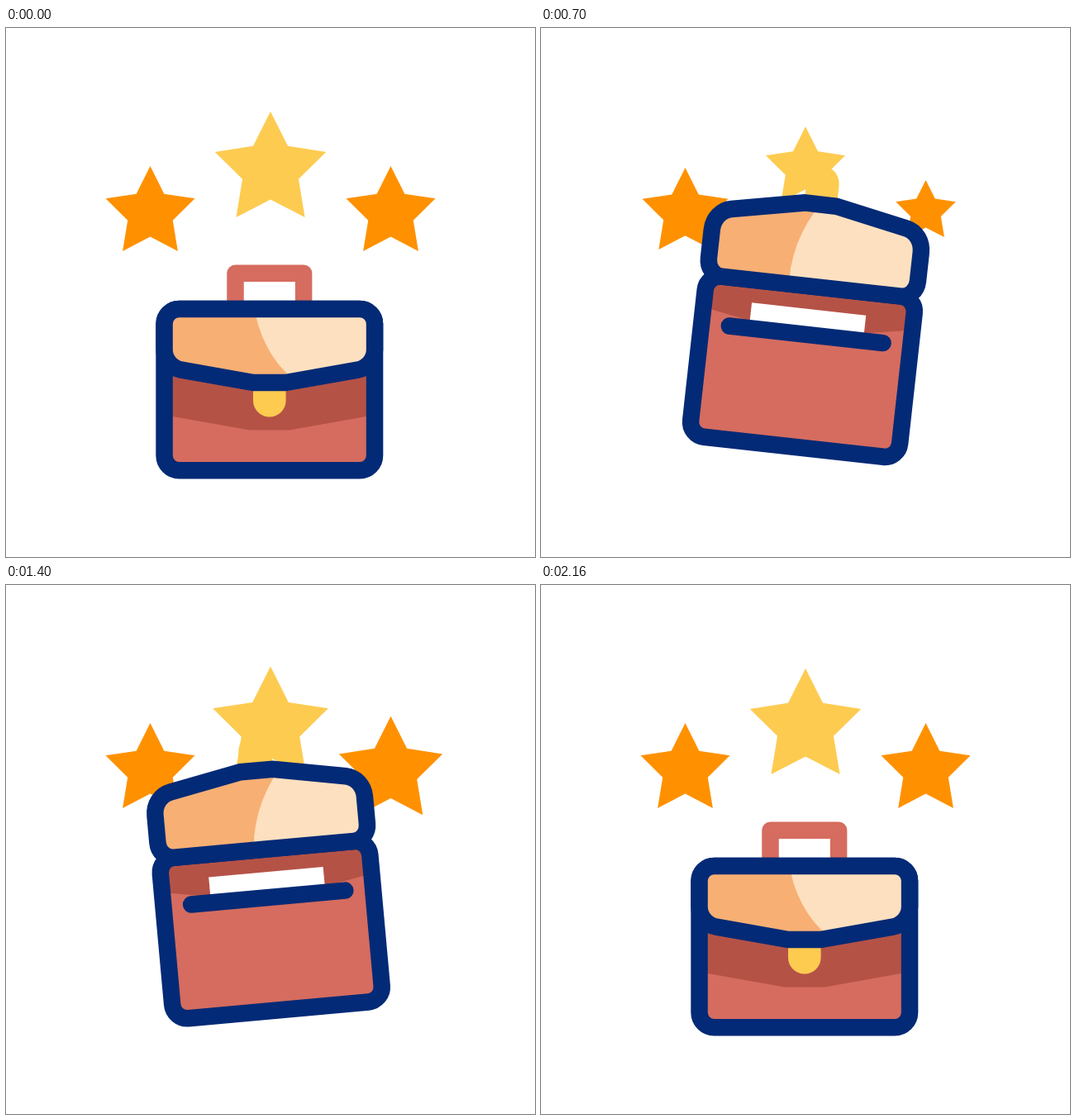
Animation, 640 px wide and 640 px high, one loop 2400 ms. Source, as an HTML page with a canvas:

```html
<!DOCTYPE html>
<html lang="en">
<head>
<meta charset="utf-8">
<title>Briefcase</title>
<style>
html, body { margin: 0; width: 100%; height: 100%; overflow: hidden; background: #fff; }
canvas { display: block; width: 100vmin; height: 100vmin; }
</style>
</head>
<body>
<canvas id="stage"></canvas>
<script>
const SIZE = 640, LOOP = 2400, ACTIVE = 2160, LINE = 20.5;
const NAVY = '#032a76', RED = '#d56c5f', DARK = '#b55246', TAN = '#f7af74',
      CREAM = '#fde0bf', YELLOW = '#fdcb50', ORANGE = '#ff9100';

// Case geometry: x from its middle, y from the hinge
const CENTER = 318.8, HINGE = 340, PIVOT = 76;
const HALF = 127.25, HEIGHT = 195.3, DEPTH = 89, RADIUS = 18, OPEN = -1.12;

const STARS = [
  { x: 174.5, y: 218.5, r: 56.8, color: ORANGE, delay: 0, low: 0.66, high: 1.29 },
  { x: 320, y: 165, r: 70.7, color: YELLOW, delay: 165, low: 0.68, high: 1.22 },
  { x: 465.5, y: 218.5, r: 56.8, color: ORANGE, delay: 360, low: 0.6, high: 1.18 }
];

const canvas = document.getElementById('stage');
const ctx = canvas.getContext('2d');
const ratio = Math.max(1, window.devicePixelRatio || 1);
canvas.width = canvas.height = SIZE * ratio;

// Eases 0 to 1 between two times
function ease(t, from, to) {
  const p = Math.min(1, Math.max(0, (t - from) / (to - from)));
  return (1 - Math.cos(Math.PI * p)) / 2;
}

// Eases through values reached at the given times
function through(t, times, values) {
  let v = values[0];
  for (let i = 1; i < values.length; i++) {
    v += (values[i] - values[i - 1]) * ease(t, times[i - 1], times[i]);
  }
  return v;
}

const hop = t => through(t, [0, 300, 745, 1050, 1400, 1780, ACTIVE], [0, 61, -30, 55, -20.5, 15.5, 0]);

function sway(t) {
  const peaks = [0, -15, 16, -6.5, 3, 0];
  return through(t, peaks.map((_, i) => i * ACTIVE / 5), peaks);
}

const lidScale = t => 1 + (OPEN - 1) * (ease(t, 160, 590) - ease(t, 1340, 2002));

function starScale(star, t) {
  const low = 455 + star.delay, high = low + 505;
  return through(t, [153 + 0.7 * star.delay, low, high, high + 380], [1, star.low, star.high, 1]);
}

function baseTransform() {
  ctx.setTransform(ratio, 0, 0, ratio, 0, 0);
}

function fill(color) {
  ctx.fillStyle = color;
  ctx.fill();
}

function stroke(color, join = 'miter') {
  ctx.strokeStyle = color;
  ctx.lineWidth = LINE;
  ctx.lineJoin = join;
  ctx.lineCap = 'round';
  ctx.stroke();
}

function poly(points) {
  ctx.beginPath();
  points.forEach(p => ctx.lineTo(p[0], p[1]));
}

const mirror = points => [...points, ...points.map(([x, y]) => [-x, y]).reverse()];

function drawStar(star, t) {
  const s = starScale(star, t), points = [];
  // The star scales about the middle of its bounding box
  const drop = star.r * (1 - Math.cos(Math.PI / 5)) / 2;
  for (let i = 0; i < 10; i++) {
    const r = star.r * (i % 2 ? 0.505 : 1), a = i * Math.PI / 5;
    points.push([star.x + s * r * Math.sin(a), star.y + s * (drop - r * Math.cos(a))]);
  }
  poly(points);
  fill(star.color);
}

function bodyPath() {
  ctx.beginPath();
  ctx.roundRect(-HALF, 0, 2 * HALF, HEIGHT, RADIUS);
}

function drawBody(k) {
  poly(mirror([[41.3, 5], [41.3, -43.3]]));
  stroke(RED, 'round');

  bodyPath();
  fill(RED);

  // The lid's shade slides up as the lid opens
  const up = 42 * (k - 1);
  poly(mirror([[124, 5], [124, 128.7 + up], [24, 146.5 + up]]));
  fill(DARK);

  ctx.fillStyle = '#fff';
  ctx.fillRect(-69.5, 27.5, 139, 31);
  poly(mirror([[93.5, 58.5]]));
  stroke(NAVY);

  bodyPath();
  stroke(NAVY);
}

function lidPath(k) {
  const corner = 70, fold = 19.5;
  ctx.save();
  ctx.scale(1, k);
  ctx.beginPath();
  ctx.moveTo(0, 0);
  ctx.arcTo(HALF, 0, HALF, corner, RADIUS);
  ctx.arcTo(HALF, corner, fold, DEPTH, 25);
  ctx.lineTo(fold, DEPTH);
  ctx.lineTo(-fold, DEPTH);
  ctx.arcTo(-HALF, corner, -HALF, 0, 25);
  ctx.arcTo(-HALF, 0, 0, 0, RADIUS);
  ctx.closePath();
  ctx.restore();
}

function drawClasp(k) {
  ctx.save();
  ctx.scale(1, k);
  ctx.beginPath();
  ctx.roundRect(-19.8, DEPTH, 39.6, 41.5, [0, 0, 19.8, 19.8]);
  fill(YELLOW);
  ctx.restore();
}

function drawLid(k) {
  lidPath(k);
  fill(TAN);

  // The light patch stays still while the lid moves across it
  ctx.save();
  ctx.clip();
  baseTransform();
  ctx.beginPath();
  ctx.moveTo(SIZE, 458);
  ctx.ellipse(435.5, 320, 136, 138, 0, Math.PI / 2, Math.PI);
  ctx.ellipse(435.5, 320, 136, 152, 0, Math.PI, Math.PI * 1.5);
  ctx.lineTo(SIZE, 168);
  fill(CREAM);
  ctx.restore();

  lidPath(k);
  stroke(NAVY);
}

function draw(t) {
  baseTransform();
  ctx.fillStyle = '#fff';
  ctx.fillRect(0, 0, SIZE, SIZE);
  STARS.forEach(star => drawStar(star, t));

  const k = lidScale(t);
  ctx.translate(CENTER, HINGE + PIVOT + hop(t));
  ctx.rotate(sway(t) * Math.PI / 180);
  ctx.translate(0, -PIVOT);
  drawBody(k);
  drawClasp(k);
  drawLid(k);
}

const start = performance.now();
function tick() {
  draw((performance.now() - start) % LOOP);
  requestAnimationFrame(tick);
}
tick();
</script>
</body>
</html>
```
